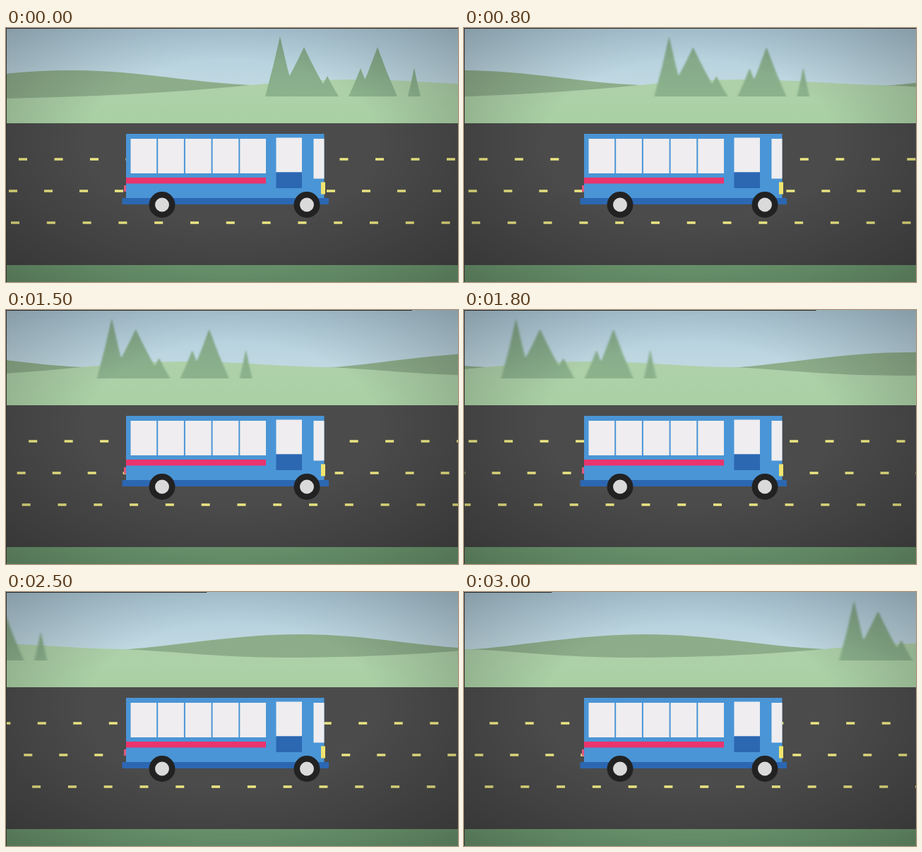
An HTML page that plays this animation: 640 px wide and 360 px high, repeating every 3100 ms.

```html
<!DOCTYPE html>
<html>
<head>
<meta charset="utf-8">
<title>Bus ride</title>
<style>
html, body { margin: 0; width: 100%; height: 100%; overflow: hidden; }
svg { display: block; width: 640px; height: 360px; }
</style>
</head>
<body>
<svg viewBox="0 0 640 360">
  <defs>
    <linearGradient id="sky" x2="0" y2="1">
      <stop stop-color="#b0cddb"/><stop offset="1" stop-color="#cbe0e6"/>
    </linearGradient>
    <linearGradient id="land" x2="0" y2="1">
      <stop stop-color="#afd1aa"/><stop offset="1" stop-color="#a9cfa4"/>
    </linearGradient>
    <linearGradient id="pine" gradientUnits="userSpaceOnUse" y1="12" x2="0" y2="97">
      <stop stop-color="#82a489"/><stop offset="1" stop-color="#8cb28c"/>
    </linearGradient>
    <radialGradient id="vignette" cx=".5" cy=".45" r=".72">
      <stop offset=".45" stop-opacity="0"/><stop offset="1" stop-opacity=".27"/>
    </radialGradient>
    <filter id="smear" x="-5%" width="110%"><feGaussianBlur id="blur" stdDeviation="0.5 0.4"/></filter>
    <path id="hill" d="M690 82C760 78 850 60 945 60C1040 60 1110 77 1200 81V105H690z" fill="#8dad8a"/>
  </defs>

  <rect width="640" height="140" fill="url(#sky)"/>
  <rect y="135" width="640" height="201" fill="#4b4b4b"/>
  <rect y="336" width="640" height="24" fill="#74a277"/>

  <g id="scene">
    <use href="#hill" x="-853"/>
    <use href="#hill"/>
    <path fill="url(#land)" d="M-5 100Q200 96 345 81C400 76 450 73 490 73C570 73 620 80 690 81
      C760 83 820 93 930 93C1050 92 1120 88 1198 81C1253 76 1303 73 1343 73H1500V135H-5z"/>
    <g filter="url(#smear)" fill="url(#pine)">
      <path id="trees"/>
      <use href="#trees" x="853"/>
    </g>
    <g id="lanes" fill="none" stroke="#ece683" stroke-width="3.6"/>
    <path d="M0 0H813V1H0z" fill="#333"/>
  </g>

  <rect width="640" height="360" fill="url(#vignette)"/>
  <rect width="1" height="360" fill="#333"/>

  <g id="bus">
    <path d="M167 223h4v9h-4z" fill="#e2567f"/>
    <path d="M170 150H450.500V242H170z" fill="#4a95d6"/>
    <path d="M164.500 241H457V250H164.500z" fill="#2c67b2"/>
    <path id="windows" fill="#efedef"/>
    <path d="M382.500 204.500h36.500v22.500h-36.500z" fill="#2c67b2"/>
    <path d="M170 212h198v8.500H170z" fill="#ea346e"/>
    <path d="M446 218.500h6v17h-6z" fill="#f1e56f"/>
    <g id="wheels" fill="#dadada" stroke="#222" stroke-width="8.500">
      <circle cx="221" cy="250.500" r="14.200"/>
      <circle cx="426" cy="250.500" r="14.200"/>
    </g>
  </g>
</svg>
<script>
const $ = id => document.getElementById(id);

// Pines: tip x, tip y, half width at the ground
$('trees').setAttribute('d', [
  [388, 12, 21], [422, 27, 37], [455, 68, 16],
  [502, 57, 17], [526, 27, 28], [578, 56, 9]
].map(([x, y, w]) => {
  const mid = (y + 97) / 2, bend = w * 0.44;
  return `M${x - w} 97Q${x - bend} ${mid} ${x} ${y}Q${x + bend} ${mid} ${x + w} 97z`;
}).join(''));

// Lane markings: first dash centre, y, spacing
$('lanes').innerHTML = [[24, 186, 50.5], [10, 231, 50], [13, 276, 50.8]]
  .map(([x, y, gap]) =>
    `<path d="M${x - 6 - gap} ${y}H1500" stroke-dasharray="12 ${gap - 12}"/>`).join('');

const pane = (x, y, w, h) => `M${x} ${y}h${w}v${h}h${-w}z`;
$('windows').setAttribute('d',
  [0, 1, 2, 3, 4].map(i => pane(176.5 + i * 38.7, 157, 36.7, 49)).join('') +
  pane(382.5, 155.5, 36.5, 49) + pane(435.5, 157, 15, 56.5));

// The bus speeds up, then holds its pace
const STEP = 100, STEPS = 31, CRUISE = 25;
const ramp = n => 8 * n + 0.526 * n * n;
const distance = n => ramp(Math.min(n, CRUISE)) + 32 * Math.max(0, n - CRUISE);

const start = performance.now();
function draw() {
  const n = Math.floor(Math.max(0, performance.now() - start) / STEP) % STEPS;
  $('scene').setAttribute('transform', `translate(${-distance(n)})`);
  $('blur').setAttribute('stdDeviation', `${0.5 + Math.min(n, CRUISE) * 0.05} 0.4`);
  requestAnimationFrame(draw);
}
draw();
</script>
</body>
</html>
```
